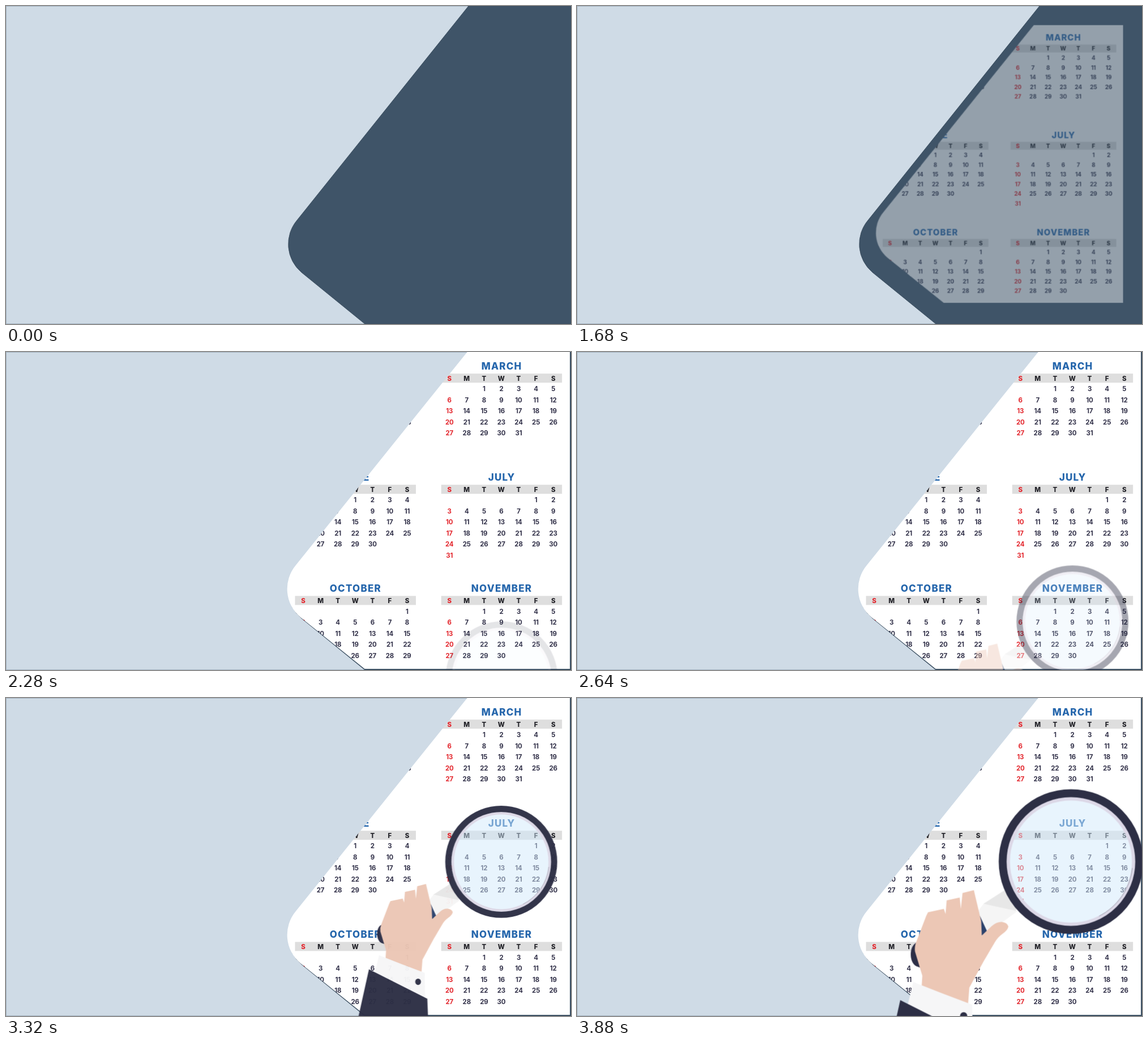
Write an HTML page that moves like this. It is 998 px wide and 561 px high and loops after 4800 ms.

```html
<!DOCTYPE html>
<html lang="en">
<head>
<meta charset="utf-8">
<title>Calendar and magnifier</title>
<style>
html, body { margin: 0; width: 100%; height: 100%; overflow: hidden; background: #cfdbe6; }
svg { display: block; width: 100vw; height: 100vh; }
text { font-family: Inter, "Open Sans", sans-serif; text-anchor: middle; }
.month { font-size: 17px; font-weight: 800; letter-spacing: 1.2px; fill: #2566ac; }
.head { font-size: 11.5px; font-weight: 800; fill: #222228; }
.day { font-size: 11.5px; font-weight: 700; letter-spacing: -.2px; fill: #33324a; }
.head.sun, .day.sun { fill: #e3262d; }
#page { transform-origin: 746px 276.5px; animation: zoom 4800ms infinite; }
#lens { transform-origin: 0 0; animation: rise 4800ms infinite; }
/* motion advances in 40 ms steps */
@keyframes zoom {
  0% { opacity: 0; transform: scale(.791); animation-timing-function: step-end; }
  31.66% { opacity: .083; transform: scale(.791); animation-timing-function: steps(10); }
  40%, 100% { opacity: 1; transform: scale(1); }
}
@keyframes rise {
  0% { opacity: 0; transform: translate(875.5px, 618px) scale(.775); filter: blur(1px); animation-timing-function: step-end; }
  44.16% { opacity: 0; transform: translate(875.5px, 618px) scale(.775); filter: blur(1px); animation-timing-function: steps(30); }
  69.16% { opacity: .97; transform: translate(874.75px, 289px) scale(.775); filter: blur(1px); animation-timing-function: steps(12); }
  79.16%, 100% { opacity: 1; transform: translate(872.5px, 288.5px) scale(1); filter: blur(0); }
}
</style>
</head>
<body>
<svg viewBox="0 0 998 561">
  <defs>
    <clipPath id="cut">
      <path d="M815.5-1 L512 376 A65.3 65.3 0 0 0 520 468 L633.5 559 H996 V-1Z"/>
    </clipPath>
  </defs>
  <rect width="998" height="561" fill="#cfdbe6"/>
  <rect x=".5" y=".5" width="997" height="560" fill="none" stroke="#a3b3c2"/>
  <path d="M817 0 L514 378 A65.3 65.3 0 0 0 522 470 L634 561 H998 V0Z" fill="#3f5468" stroke="#304354" stroke-width=".8"/>
  <g id="page">
    <g id="sheet" clip-path="url(#cut)">
      <rect x="490" y="-1" width="506" height="560" fill="#fff"/>
    </g>
  </g>
  <g id="lens">
    <g transform="translate(-872.5 -288.5)">
      <path d="M757 338 L718 363 L774 379 L780 360Z" fill="#e7e7e7"/>
      <path d="M718 363 L707 378 L725 415 L778 376Z" fill="#f5f5f5"/>
      <path d="M706 381 L712 385 L725 413 L719 418 L708 420Z" fill="#2c426c"/>
      <path d="M601 431 C586 436 586 466 599 473 L607 476 L620 440Z" fill="#2d2f47"/>
      <circle cx="872.5" cy="288.5" r="108.5" fill="#d1e9fb" fill-opacity=".5"/>
      <circle cx="872.5" cy="288.5" r="110.7" fill="none" stroke="#dcd8e7" stroke-width="6"/>
      <path d="M981 300 A108.5 108.5 0 0 1 922 385" fill="none" stroke="#8d93a0" stroke-width=".8"/>
      <circle cx="872.5" cy="288.5" r="120.6" fill="none" stroke="#2d2f45" stroke-width="14"/>
      <path d="M608 520 L610 490 L597 447 Q596 439 599 431 L617 384 L620 378 L648 372 L651 381 L653 357 L676 352 L678 372 L681 344 L701 339 L714 394 L715 419 L733 402 Q741 395 750 395 Q760 396 762 403 Q761 409 753 415 Q743 422 738 431 L718 465 L693 511 L690 550Z" fill="#ecc7b5"/>
      <path d="M594 501 L645 521 L698 541 L699 601 L584 542Z" fill="#f6f6f7"/>
      <ellipse cx="683" cy="561.5" rx="6.5" ry="7.3" fill="#2d2f45"/>
      <path d="M571 533 L704 600 L706 650 H545Z" fill="#2d2f45"/>
    </g>
  </g>
</svg>
<script>
const sheet = document.getElementById("sheet");
const COL = 30.58, ROW = 19.5;

function add(tag, attrs, label = "") {
  const el = document.createElementNS("http://www.w3.org/2000/svg", tag);
  for (const key in attrs) el.setAttribute(key, attrs[key]);
  el.textContent = label;
  sheet.append(el);
}

// x, y: centre of the first header letter; first: weekday of day 1
function month(name, x, y, first, days) {
  const cell = (kind, col, dy, label) =>
    add("text", { x: x + col * COL, y: y + dy + 4.2, class: kind + (col ? "" : " sun") }, label);
  add("text", { x: x + 3 * COL + .6, y: y - 15.8, class: "month" }, name);
  add("rect", { x: x - 14.5, y: y - 8.2, width: 213.5, height: 16, fill: "#dedede" });
  [..."SMTWTFS"].forEach((letter, col) => cell("head", col, 0, letter));
  for (let day = 1; day <= days; day++) {
    const slot = first + day - 1;
    cell("day", slot % 7, 18.8 + Math.floor(slot / 7) * ROW, day);
  }
}

const LEFT = 525, RIGHT = 783.2;
month("FEBRUARY", LEFT, 46.3, 2, 28);
month("MARCH", RIGHT, 46.3, 2, 31);
month("JUNE", LEFT, 242.4, 3, 30);
month("JULY", RIGHT, 242.4, 5, 31);
month("OCTOBER", LEFT, 438.5, 6, 31);
month("NOVEMBER", RIGHT, 438.5, 2, 30);
</script>
</body>
</html>
```
